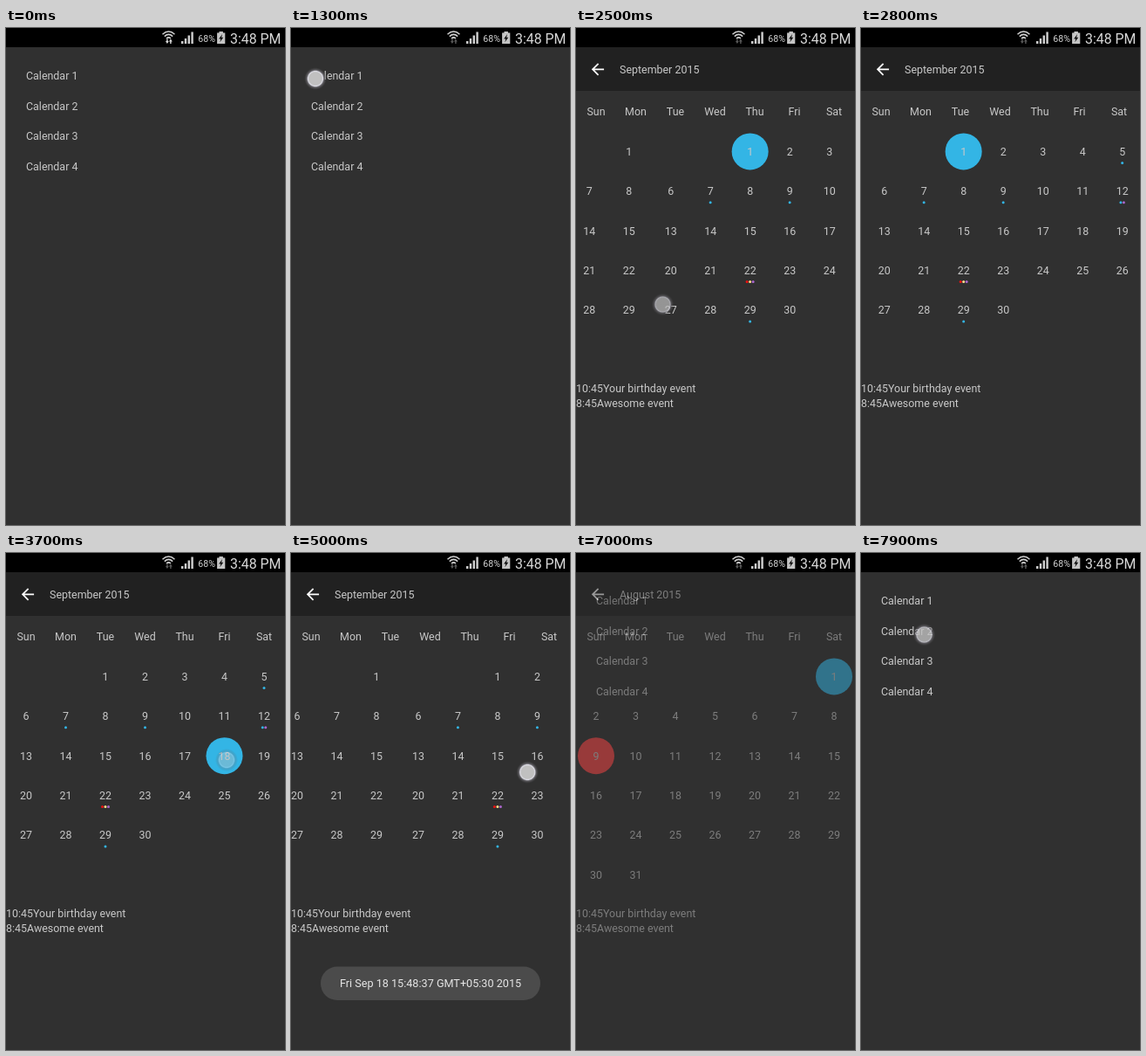
These frames come from a looping animation (320x569 px, 8 s). An HTML page:

```html
<!DOCTYPE html>
<html lang="en">
<head>
<meta charset="utf-8">
<title>Calendar</title>
<style>
  html, body { margin: 0; width: 100%; height: 100%; overflow: hidden; background: #303030; }
  svg { display: block; width: 320px; height: 569px; font: 12.44px Roboto, sans-serif; fill: #c8c8c8; }
  .mid { text-anchor: middle; }
</style>
</head>
<body>
<svg viewBox="0 0 320 569">
  <defs>
    <radialGradient id="glow">
      <stop offset="0" stop-color="#c0c0c0"/>
      <stop offset=".55" stop-color="#c0c0c0"/>
      <stop offset=".66" stop-color="#dcdce4"/>
      <stop offset=".76" stop-color="#77757c" stop-opacity=".7"/>
      <stop offset="1" stop-color="#444" stop-opacity="0"/>
    </radialGradient>
  </defs>
  <rect width="320" height="569" fill="#303030"/>
  <g id="list"></g>
  <g id="screen">
    <rect y="22" width="320" height="547" fill="#303030"/>
    <rect y="18" width="320" height="54" fill="#212121"/>
    <path transform="translate(14.3 36.6) scale(.889)" fill="#fff"
      d="M20 11H7.83l5.59-5.59L12 4l-8 8 8 8 1.41-1.41L7.83 13H20z"/>
    <text id="title" x="50" y="52"></text>
    <g id="week"></g>
    <g id="aug"></g>
    <g id="sep"></g>
    <text x="0" y="416.6">10:45Your birthday event</text>
    <text x="0" y="433.6">8:45Awesome event</text>
  </g>
  <g id="toast">
    <rect x="34" y="473.5" width="252" height="38.5" rx="19.2" fill="#4b4b4b"/>
    <text class="mid" x="160" y="497.4" font-size="12.65" fill="#e6e6e6">Fri Sep 18 15:48:37 GMT+05:30 2015</text>
  </g>
  <circle id="touch" r="13" fill="url(#glow)"/>
  <rect width="320" height="22" fill="#000"/>
  <path d="M179.500 7.200Q186.500 .8 193.500 7.200M181.800 9.600Q186.500 5.200 191.200 9.600M184 12Q186.500 9.800 189 12"
    fill="none" stroke="#d0d0d0" stroke-width="1.5"/>
  <path id="arrows" fill="#e0e0e0"
    d="M183 15h1.200v-2.400h1.400v2.400h1.200l-1.900 3zM187 15.500h1.200v2.500h1.400v-2.500h1.200l-1.900-3z"/>
  <path d="M201 15h2.400v3h-2.400zM204.800 12h2.400v6h-2.400zM208.600 8.500h2.400v9.500h-2.400zM212.400 4.500h2.400v13.500h-2.400z" fill="#d0d0d0"/>
  <text x="220.3" y="15.9" font-size="10.6" fill="#d0d0d0">68%</text>
  <path d="M244.500 4h4.400v1.600h2.400V18h-9.200V5.600h2.400z" fill="#c4c4c4"/>
  <path d="M248.100 7l-4 5.600h2.200l-1 3.600 4-5.400h-2.200z" fill="#111"/>
  <text x="257" y="18" font-size="15.9" fill="#d8d8d8">3:48 PM</text>
</svg>
<script>
const LOOP = 8000, STEP = 100, PAGE = 321;
const BLUE = '#33b5e5', RED = '#ff4444', PURPLE = '#aa66cc';
const $ = id => document.getElementById(id);

function add(parent, tag, attrs, text) {
  const el = document.createElementNS('http://www.w3.org/2000/svg', tag);
  for (const k in attrs) el.setAttribute(k, attrs[k]);
  if (text !== undefined) el.textContent = text;
  parent.append(el);
  return el;
}
const colX = c => 23 + 45.5 * c;
const rowY = r => 141.4 + 45.4 * r;
const label = (parent, x, y, text) => add(parent, 'text', { x, y: y + 4.4, class: 'mid' }, text);

for (let i = 0; i < 4; i++)
  add($('list'), 'text', { x: 23, y: 58.9 + 34.7 * i }, 'Calendar ' + (i + 1));
['Sun', 'Mon', 'Tue', 'Wed', 'Thu', 'Fri', 'Sat'].forEach((d, i) => label($('week'), colX(i), 95.3, d));

// Builds a month page; returns a function placing it and its day circles.
function month(group, first, days, events = {}) {
  const pos = d => [colX((first + d - 1) % 7), rowY(Math.floor((first + d - 1) / 7))];
  const circle = fill => add(group, 'circle', { r: 21, fill });
  const today = circle(RED), picked = circle(BLUE);
  for (let d = 1; d <= days; d++) {
    const [x, y] = pos(d), dots = events[d] || [];
    label(group, x, y, d);
    dots.forEach((fill, i) =>
      add(group, 'circle', { cx: x + (i - (dots.length - 1) / 2) * 3.5, cy: y + 13, r: 1.5, fill }));
  }
  const place = (c, day) => {
    c.style.display = day ? '' : 'none';
    const [x, y] = pos(day || 1);
    c.setAttribute('cx', x);
    c.setAttribute('cy', y);
  };
  return (x, pick, now) => {
    group.setAttribute('transform', `translate(${x} 0)`);
    place(picked, pick);
    place(today, now);
  };
}
const drawAug = month($('aug'), 6, 31);
const drawSep = month($('sep'), 2, 30, {
  5: [BLUE], 7: [BLUE], 9: [BLUE], 12: [BLUE, PURPLE], 22: ['#e11', '#ffdd88', PURPLE], 29: [BLUE]
});

const ramp = (t, a, b) => Math.min(1, Math.max(0, (t - a) / (b - a)));
const pulse = (t, a, b, fade) => ramp(t, a, a + fade) * (1 - ramp(t, b - fade, b));

// Drag followed by a long settle
function fling(t, a, b) {
  const v = ramp(t, a, b) ** .6235;
  return PAGE * v * v * (3 - 2 * v);
}
const forward = t => fling(t, 2100, 2877);
const back = t => fling(t, 4800, 5600);

const touches = [
  { from: 1000, to: 1500, x: () => 28, y: 58 },
  { from: 2000, to: 2640, x: t => Math.max(99.5, 310 - forward(t)), y: 316.5 },
  { from: 3300, to: 3780, x: () => 253, y: 237 },
  { from: 4700, to: 5200, x: t => 148.3 + back(t), y: 251 },
  { from: 7740, to: 8200, x: () => 72.5, y: 93.5 }
];

function draw(t) {
  const x = back(t) - forward(t), inSep = t >= 2400 && t < 5100;
  $('screen').style.opacity = pulse(t, 1600, 7100, 200);
  $('screen').setAttribute('transform', `translate(0 ${44 * (1 - ramp(t, 1600, 1900)) ** 3.4})`);
  $('title').textContent = inSep ? 'September 2015' : 'August 2015';
  drawAug(x, t < 2400 ? 9 : inSep ? 0 : 1, t < 2400 ? 0 : 9);
  drawSep(x + PAGE, t < 3700 ? 1 : 18, 0);
  $('toast').style.opacity = pulse(t, 3800, 5600, 500);

  const touch = touches.find(p => t >= p.from && t < p.to);
  $('touch').style.opacity = touch ? pulse(t, touch.from, touch.to, 200) : 0;
  if (touch) {
    $('touch').setAttribute('cx', touch.x(t));
    $('touch').setAttribute('cy', touch.y);
  }
  $('arrows').style.opacity = t < 400 ? 1 : .4;
}

const start = performance.now();
function frame() {
  const t = (performance.now() - start) % LOOP;
  draw(Math.floor(t / STEP) * STEP);
  requestAnimationFrame(frame);
}
frame();
</script>
</body>
</html>
```
